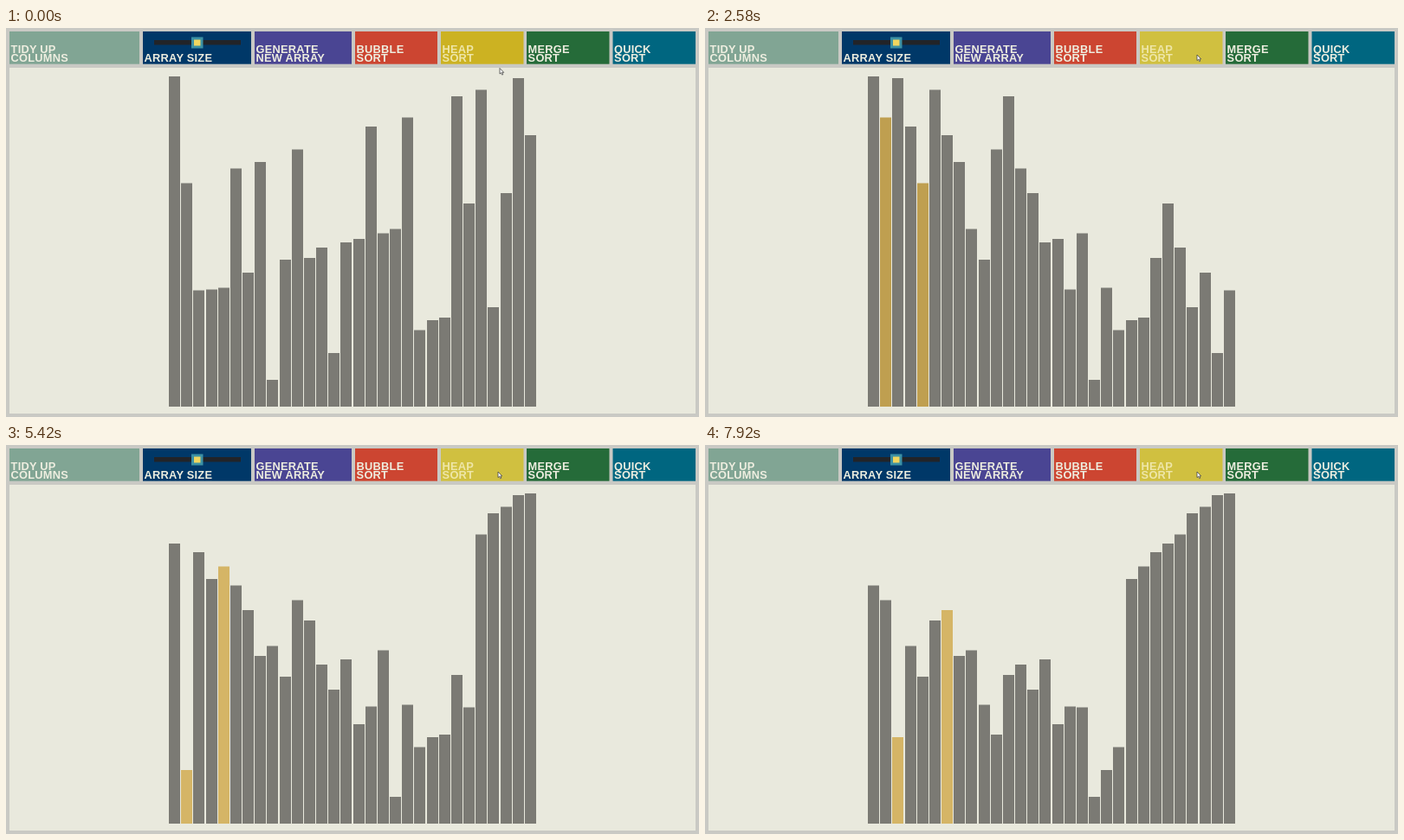
Write an HTML page that moves like this. It is 800x450 px and loops after 8 s.

```html
<!DOCTYPE html>
<html lang="en">
<head>
<meta charset="utf-8">
<title>Heap sort</title>
<style>
  html, body { margin: 0; width: 100%; height: 100%; overflow: hidden; background: #c9c9c4; }
  svg { display: block; width: 800px; height: 450px; }
  text { font: bold 12.8px "Liberation Sans", Arial, sans-serif; letter-spacing: .25px; fill: #eeeee0; }
</style>
</head>
<body>
<svg id="stage" viewBox="0 0 800 450"></svg>
<script>
const LOOP = 8000, FPS = 12, FIRST_SWAP_FRAME = 5;
const GREY = '#7b7a74', BEFORE = '#d5b566', AFTER = '#bf9f50';
const FLOOR = 438;
const startTops = [
  56, 179.5, 303.5, 302.5, 300.5, 162.5, 283, 155, 407, 268,
  140.5, 266, 254, 376, 248, 244, 114, 237.5, 232.5, 103.5,
  349.5, 338, 335, 79, 203, 71.5, 323, 191, 58, 124
];
const buttons = [
  [4, 150, '#81a594', 'TIDY UP', 'COLUMNS'],
  [158, 125, '#003868', '', 'ARRAY SIZE'],
  [287, 112, '#4a4593', 'GENERATE', 'NEW ARRAY'],
  [403, 95, '#cc4531', 'BUBBLE', 'SORT'],
  [502, 95.5, '#ccb222', 'HEAP', 'SORT'],
  [601, 95.5, '#256b39', 'MERGE', 'SORT'],
  [700.5, 95.5, '#006680', 'QUICK', 'SORT']
];

const stage = document.getElementById('stage');

function add(tag, attrs, content = '') {
  const node = document.createElementNS('http://www.w3.org/2000/svg', tag);
  for (const key in attrs) node.setAttribute(key, attrs[key]);
  node.textContent = content;
  return stage.appendChild(node);
}

const rect = (x, y, width, height, fill) => add('rect', { x, y, width, height, fill });

// Lists every swap of a heap sort; a smaller top means a taller bar.
function heapSortSwaps(tops) {
  const a = [...tops], swaps = [];
  const swap = (i, j) => {
    [a[i], a[j]] = [a[j], a[i]];
    swaps.push([i, j]);
  };
  const siftDown = (root, size) => {
    let tallest = root;
    for (const child of [2 * root + 1, 2 * root + 2])
      if (child < size && a[child] < a[tallest]) tallest = child;
    if (tallest === root) return;
    swap(root, tallest);
    siftDown(tallest, size);
  };
  for (let i = (a.length >> 1) - 1; i >= 0; i--) siftDown(i, a.length);
  for (let end = a.length - 1; end > 0; end--) {
    swap(0, end);
    siftDown(0, end);
  }
  return swaps;
}

const swaps = heapSortSwaps(startTops);

rect(4, 46, 792, 400, '#e9e9dd');

const faces = buttons.map(([x, width, color, line1, line2]) => {
  const face = rect(x, 4, width, 37.7, color);
  const labels = [[line1, 28.5], [line2, 39.3]].map(([label, y]) => add('text', { x: x + 1.6, y }, label));
  return { face, labels };
});
const heapButton = faces[4];
heapButton.labels.forEach(label => label.style.fill = '#eee6a8');

// Size slider
rect(171, 14, 100, 5.5, '#222428');
rect(214, 10.5, 13.5, 13, '#3c91a4');
rect(217, 13.5, 7.5, 7, '#f0d660');

const bars = startTops.map((top, i) => rect(Math.round(188 + i * 14.167), top, 13, FLOOR - top, GREY));

const cursor = add('path', {
  d: 'M0 0V6.6L1.5 5.3L2.7 7.7L3.8 7.2L2.7 4.9H4.7Z',
  fill: '#fff', stroke: '#444', 'stroke-width': .8
});

function draw(ms) {
  const frame = Math.floor((ms + 4) * FPS / 1000);

  const approach = Math.min(frame / 3, 1);
  cursor.setAttribute('transform', `translate(${570 - 2 * approach} ${46.5 - 15.5 * approach})`);
  heapButton.face.setAttribute('fill', frame >= 2 ? '#d0c040' : '#ccb222');

  // Each swap lasts three half-frames: marked, exchanged, unmarked.
  const step = 2 * (frame - FIRST_SWAP_FRAME);
  const current = Math.floor(step / 3), phase = step % 3;
  const done = step < 0 ? 0 : current + (phase > 0);
  const tops = [...startTops];
  for (const [i, j] of swaps.slice(0, done)) [tops[i], tops[j]] = [tops[j], tops[i]];

  const marked = step < 0 ? [] : swaps[current];
  const markColor = [BEFORE, AFTER, GREY][phase];
  bars.forEach((bar, i) => {
    bar.setAttribute('y', tops[i]);
    bar.setAttribute('height', FLOOR - tops[i]);
    bar.setAttribute('fill', marked.includes(i) ? markColor : GREY);
  });
}

const start = performance.now();
function tick() {
  draw((performance.now() - start) % LOOP);
  requestAnimationFrame(tick);
}
tick();
</script>
</body>
</html>
```
